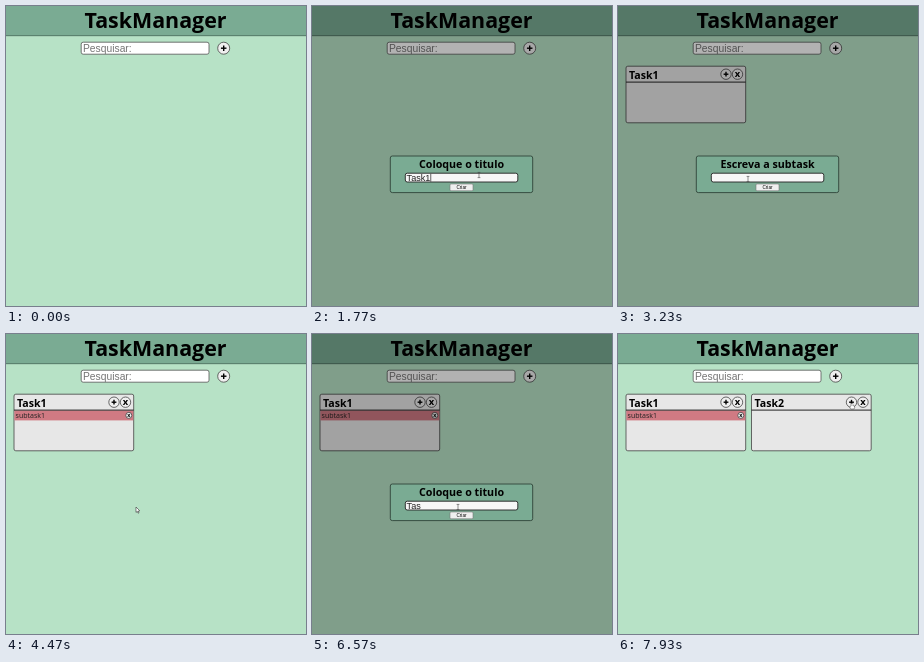
An HTML page with a canvas that plays this animation: 300 by 300 pixels, repeating every 8000 ms.

```html
<!DOCTYPE html>
<html lang="pt">
<head>
<meta charset="utf-8">
<title>TaskManager</title>
<style>
  html, body { margin: 0; width: 100%; height: 100%; overflow: hidden; background: #b7e2c6; }
  canvas { display: block; width: 300px; height: 300px; }
</style>
</head>
<body>
<canvas id="stage"></canvas>
<script>
const SIZE = 300, LOOP = 8000;
const canvas = document.getElementById('stage');
const ctx = canvas.getContext('2d');
const ratio = window.devicePixelRatio || 1;
canvas.width = canvas.height = SIZE * ratio;

const GREEN = '#7aab93';
const UI = '"Open Sans", "Noto Sans", sans-serif';
const FIELD = '"Liberation Sans", Arial, sans-serif';

// Each dialog: when it opens and closes, and when every letter is typed.
const dialogs = [
  { open: 730, close: 1970, title: 'Coloque o titulo', text: 'Task1',
    keys: [1370, 1470, 1530, 1670, 1770] },
  { open: 2730, close: 4330, title: 'Escreva a subtask', text: 'subtask1',
    keys: [3400, 3470, 3530, 3570, 3630, 3670, 3730, 3930] },
  { open: 5560, close: 7270, title: 'Coloque o titulo', text: 'Task2',
    keys: [5930, 6000, 6070, 6670, 6870] }
];

// Pointer stops: time, x, y.
const pointerPath = [
  [200, 262, 150], [560, 218, 43], [730, 218, 43], [1000, 163, 168],
  [1230, 167, 169], [2270, 167, 169], [2560, 108, 72], [2730, 108, 72],
  [2970, 130, 173], [5070, 130, 173], [5430, 218, 43], [5560, 218, 43],
  [5870, 152, 170], [6200, 146, 173], [7530, 146, 173], [7900, 234, 69]
];

function label(text, x, y, font, color = '#000', align = 'left') {
  ctx.font = font;
  ctx.fillStyle = color;
  ctx.textAlign = align;
  ctx.fillText(text, x, y);
}

function box(x, y, w, h, radius, fill, stroke, width = 0.8) {
  ctx.beginPath();
  ctx.roundRect(x, y, w, h, radius);
  ctx.fillStyle = fill;
  ctx.fill();
  ctx.strokeStyle = stroke;
  ctx.lineWidth = width;
  ctx.stroke();
}

function line(points, color, width) {
  ctx.beginPath();
  points.forEach(([x, y]) => ctx.lineTo(x, y));
  ctx.strokeStyle = color;
  ctx.lineWidth = width;
  ctx.stroke();
}

function roundButton(x, y, r, sign) {
  box(x - r, y - r, r * 2, r * 2, r, '#efefef', '#444', 0.8);
  const a = r * 0.46;
  if (sign === '+') {
    line([[x - a, y], [x + a, y]], '#000', 1.4);
    line([[x, y - a], [x, y + a]], '#000', 1.4);
  } else {
    label('x', x, y + r * 0.52, `bold ${r * 1.8}px ${UI}`, '#000', 'center');
  }
}

function drawPage() {
  ctx.fillStyle = '#b7e2c6';
  ctx.fillRect(0, 0, SIZE, SIZE);
  ctx.fillStyle = GREEN;
  ctx.fillRect(0, 0, SIZE, 30);
  line([[0, 29.7], [SIZE, 29.7]], '#4c6b5c', 0.8);
  label('TaskManager', 149.5, 22, `bold 21.4px ${UI}`, '#000', 'center');
  box(75.2, 36.2, 127.8, 12, 2, '#fff', '#555');
  label('Pesquisar:', 77, 45.6, `10.3px ${FIELD}`, '#757575');
  roundButton(217.7, 42.2, 6, '+');
}

function drawCard(x, title, subtask) {
  box(x, 60.2, 119.7, 56.6, 1.8, '#e7e7e7', '#555', 0.9);
  label(title, x + 3, 73, `bold 10.6px ${UI}`);
  roundButton(x + 100, 68.2, 5.2, '+');
  roundButton(x + 111.5, 68.2, 5.2, 'x');
  if (subtask) {
    ctx.fillStyle = '#d07a83';
    ctx.fillRect(x + 0.4, 76.4, 118.9, 10);
    label(subtask, x + 1.6, 84, `7.05px ${UI}`, '#222');
    roundButton(x + 114.8, 81.4, 3, 'x');
  }
  line([[x, 76.1], [x + 119.7, 76.1]], '#222', 1);
}

function drawDialog(dialog, t) {
  ctx.fillStyle = 'rgba(0,0,0,0.3)';
  ctx.fillRect(0, 0, SIZE, SIZE);
  box(78.3, 150, 142.4, 36.6, 2, GREEN, '#2f4439', 0.9);
  label(dialog.title, 149.5, 162.3, `bold 10.7px ${UI}`, '#000', 'center');
  box(93.3, 167.2, 112.5, 8.8, 2, '#f7f7f7', '#222', 0.9);
  box(138, 178, 23, 6.8, 1, '#efefef', '#777', 0.6);
  label('Criar', 149.5, 183.2, `4.7px ${FIELD}`, '#000', 'center');

  const typed = dialog.keys.filter(key => key <= t);
  const text = dialog.text.slice(0, typed.length);
  label(text, 94.6, 174.5, `9.1px ${FIELD}`, '#222');
  const since = t - (typed.length ? typed[typed.length - 1] : dialog.open);
  if (since % 1000 < 500) {
    const x = 95 + ctx.measureText(text).width;
    line([[x, 167.8], [x, 175.6]], '#222', 0.7);
  }
}

function pointerAt(t) {
  if (t < pointerPath[0][0]) return null;
  const next = pointerPath.findIndex(stop => stop[0] > t);
  if (next < 0) return pointerPath[pointerPath.length - 1].slice(1);
  const [t0, x0, y0] = pointerPath[next - 1];
  const [t1, x1, y1] = pointerPath[next];
  const p = (t - t0) / (t1 - t0);
  const ease = p * p * (3 - 2 * p);
  return [x0 + (x1 - x0) * ease, y0 + (y1 - y0) * ease];
}

function drawPointer(x, y, inDialog) {
  const near = (cx, cy) => Math.hypot(x - cx, y - cy) < 6;
  ctx.save();
  ctx.translate(x, y);
  if (inDialog && x > 93 && x < 206 && y > 166 && y < 177) {
    line([[-1.4, -2.6], [1.4, -2.6]], '#444', 0.6);
    line([[0, -2.6], [0, 2.6]], '#444', 0.6);
    line([[-1.4, 2.6], [1.4, 2.6]], '#444', 0.6);
  } else if (!inDialog && (near(217.7, 42.2) || near(108, 69) || near(233.5, 69))) {
    box(-0.7, 0, 1.5, 4, 0.7, '#fff', '#333', 0.5);
    box(-2, 2.6, 4.6, 3.4, 1.3, '#fff', '#333', 0.5);
    ctx.fillStyle = '#fff';
    ctx.fillRect(-0.45, 1, 1, 3);
  } else {
    ctx.beginPath();
    [[0, 0], [0, 5.4], [1.3, 4.3], [2.1, 6.2], [3, 5.8], [2.2, 4], [3.8, 3.8]]
      .forEach(([px, py]) => ctx.lineTo(px, py));
    ctx.closePath();
    ctx.fillStyle = '#fff';
    ctx.fill();
    ctx.strokeStyle = '#333';
    ctx.lineWidth = 0.6;
    ctx.stroke();
  }
  ctx.restore();
}

function draw(t) {
  ctx.setTransform(ratio, 0, 0, ratio, 0, 0);
  drawPage();
  const [first, sub, second] = dialogs;
  if (t >= first.close) drawCard(8, first.text, t >= sub.close && sub.text);
  if (t >= second.close) drawCard(133.5, second.text);
  const dialog = dialogs.find(d => t >= d.open && t < d.close);
  if (dialog) drawDialog(dialog, t);
  const pointer = pointerAt(t);
  if (pointer) drawPointer(...pointer, Boolean(dialog));
}

const start = performance.now();
function tick() {
  draw((performance.now() - start) % LOOP);
  requestAnimationFrame(tick);
}
tick();
</script>
</body>
</html>
```
